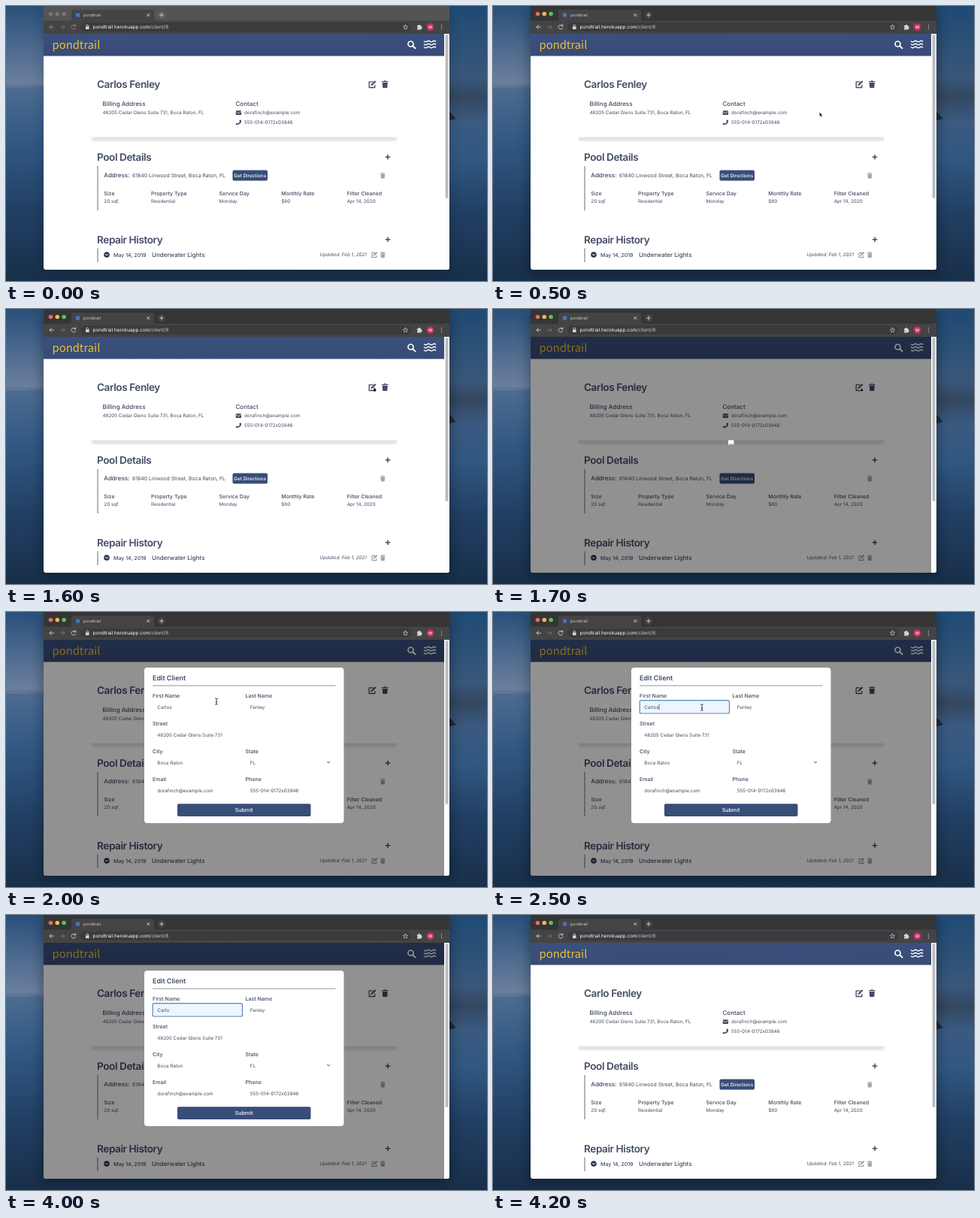
Write an HTML page that moves like this. It is 640 px wide and 366 px high and loops after 4.3 s.

```html
<!DOCTYPE html>
<html lang="en">
<head>
<meta charset="utf-8">
<title>Edit client</title>
<style>
html, body { margin: 0; width: 100%; height: 100%; overflow: hidden; background: #1b3452; }
svg { display: block; width: 100vw; height: 100vh; }
text { font-family: Inter, "Open Sans", sans-serif; font-size: 6.3px; fill: #454c62; white-space: pre; text-rendering: geometricPrecision; }
.logo { font: 500 14.8px "Noto Sans CJK JP", "Noto Sans CJK SC", "Noto Sans", sans-serif; fill: #f0bf30; }
.h { font-size: 13.6px; font-weight: 600; letter-spacing: -.42px; fill: #434d66; }
.sub { font-size: 8px; font-weight: 500; fill: #404860; }
.lab { font-size: 7px; font-weight: 500; fill: #404860; }
.title { font-size: 9px; font-weight: 600; fill: #404b66; }
.it { font-style: italic; }
.btn { font-weight: 500; fill: #fff; text-anchor: middle; }
.ui { fill: #c9cacc; }
.line { fill: none; stroke-linecap: round; stroke-linejoin: round; }
</style>
</head>
<body>
<svg viewBox="0 0 640 366" preserveAspectRatio="none">
  <defs>
    <linearGradient id="west" x2="0" y2="1">
      <stop offset="0" stop-color="#28507a"/>
      <stop offset=".14" stop-color="#4a688d"/>
      <stop offset=".28" stop-color="#6b7f9d"/>
      <stop offset=".3" stop-color="#4b6b91"/>
      <stop offset=".5" stop-color="#315883"/>
      <stop offset=".75" stop-color="#213f63"/>
      <stop offset="1" stop-color="#182f4a"/>
    </linearGradient>
    <linearGradient id="east" x2="0" y2="1">
      <stop offset="0" stop-color="#1f4a74"/>
      <stop offset=".26" stop-color="#39577a"/>
      <stop offset=".33" stop-color="#334760"/>
      <stop offset=".42" stop-color="#3a5a80"/>
      <stop offset=".55" stop-color="#315883"/>
      <stop offset=".75" stop-color="#213f63"/>
      <stop offset="1" stop-color="#182f4a"/>
    </linearGradient>
    <linearGradient id="bar" x2="0" y2="1">
      <stop offset="0" stop-color="#3b507e"/>
      <stop offset="1" stop-color="#374b75"/>
    </linearGradient>
    <filter id="soft" x="-20%" y="-100%" width="140%" height="300%"><feGaussianBlur stdDeviation="1.200"/></filter>
    <filter id="wide" x="-20%" y="-20%" width="140%" height="140%"><feGaussianBlur stdDeviation="8"/></filter>
    <clipPath id="frame"><path d="M50 0H590V347.500a3.500 3.500 0 0 1-3.500 3.500H53.500a3.500 3.500 0 0 1-3.500-3.500Z"/></clipPath>
    <g id="edit" class="line" stroke="currentColor">
      <path stroke-width="1.300" d="M6 2H1.200V9.700H8.800V6.500"/>
      <path stroke-width="2.200" stroke-linecap="butt" d="M4.300 6.400 9.700 1.200"/>
      <path stroke-width=".8" d="M3.600 7.200 4 5.800"/>
    </g>
    <g id="trash" fill="currentColor">
      <path d="M0 1H2.600L3.200 .2H5.300L5.900 1H8.500V2.200H0ZM.7 3H7.800L7.400 9.100Q7.300 10 6.400 10H2.100Q1.200 10 1.100 9.100Z"/>
    </g>
    <path id="plus" stroke="#424c66" stroke-width="1.500" stroke-linecap="round" d="M-2.700 0H2.700M0-2.700V2.700"/>
  </defs>

  <rect width="320" height="366" fill="url(#west)"/>
  <rect x="320" width="320" height="366" fill="url(#east)"/>
  <path d="M0 107.500H32" stroke="#a08a78" opacity=".35"/>
  <path d="M588 140Q593 142 596 147L599 150 588 153Z" fill="#1d2c3e"/>
  <rect id="shade" x="47" y="4" width="546" height="353" rx="6" filter="url(#wide)"/>

  <g clip-path="url(#frame)">
    <rect x="50" width="540" height="351" fill="#fff"/>
    <rect id="strip" x="50" width="540" height="20"/>
    <g id="lights"><circle cx="59.500" cy="10.500" r="2.800"/><circle cx="68.300" cy="10.500" r="2.800"/><circle cx="77.100" cy="10.500" r="2.800"/></g>
    <path d="M84 20q3 0 3-3V8q0-3 3-3H194q3 0 3 3v9q0 3 3 3Z" fill="#444445"/>
    <rect x="50" y="19.500" width="540" height="17.500" fill="#444445"/>
    <rect x="99" y="22" width="440" height="12" rx="6" fill="#3b3b3d"/>
    <rect x="93" y="9.500" width="5" height="5" fill="#3f78c8"/>
    <text class="ui" x="103" y="14" style="font-size:5.500px">pondtrail</text>
    <g class="line" stroke="#d2d3d5" stroke-width=".9">
      <path d="M187.600 10.300l3.400 3.400m0-3.400-3.400 3.400M204.600 12h4.800M207 9.600v4.800"/>
      <path id="nav" d="M63.500 28H58m2.500-2.500L58 28l2.500 2.500M92.300 26.200A2.900 2.900 0 1 0 92.800 29M92.700 24.700V26.700H90.700"/>
      <path d="M72.500 28H78m-2.500-2.500L78 28l-2.500 2.500" stroke="#77787b"/>
      <path d="M106.900 27.400V26.300a1.400 1.400 0 0 1 2.800 0V27.400"/>
      <path d="M531.500 25l.9 2 2.200.2-1.700 1.500.5 2.200-1.900-1.100-1.900 1.100.5-2.200-1.700-1.500 2.200-.2Z" stroke-width=".7"/>
    </g>
    <circle cx="207" cy="12" r="5.500" fill="#fff" opacity=".06"/>
    <rect x="106" y="27.300" width="4.600" height="3.700" rx=".5" fill="#d2d3d5"/>
    <text class="ui" x="115.500" y="30.300" style="font-size:6.400px"><tspan fill="#fff">pondtrail.herokuapp.com</tspan>/client/8</text>
    <path fill="#d2d3d5" d="M547 26h1.700a1.200 1.200 0 0 1 2.400 0H552.600v1.700a1.200 1.200 0 0 1 0 2.400V31.500H547V29.800a1.100 1.100 0 0 0 0-2.100Z"/>
    <circle cx="564.500" cy="28" r="4.800" fill="#cf2f68"/>
    <text class="btn" x="564.500" y="29.900" style="font-size:5.200px">M</text>
    <path d="M579.500 25.300v.01m0 2.690v.01m0 2.690v.01" class="line" stroke="#d2d3d5" stroke-width="1.300"/>

    <rect x="50" y="37" width="533" height="29.500" fill="url(#bar)"/>
    <text class="logo" x="61.500" y="57">pondtrail</text>
    <g class="line" stroke="#fff">
      <circle cx="538.500" cy="50.500" r="3.500" stroke-width="1.700"/>
      <path d="M541.300 53.300 544.500 56.300" stroke-width="2"/>
      <path id="waves" stroke-width="1.500"/>
    </g>

    <rect x="113.500" y="168" width="407" height="12" rx="4" fill="#000" opacity=".1" filter="url(#soft)"/>
    <rect x="110" y="72" width="414" height="102.500" fill="#fff"/>
    <text class="h" id="client" x="121" y="109"></text>
    <use href="#edit" x="482" y="98.800" color="#424c66"/>
    <use href="#trash" x="500" y="99" color="#424c66"/>
    <text class="sub" x="128.500" y="132.700">Billing Address</text>
    <text x="128.500" y="144.300">48205 Cedar Glens Suite 731, Boca Raton, FL</text>
    <text class="sub" x="305.500" y="132.700">Contact</text>
    <rect x="305.700" y="139.200" width="7.400" height="5.800" rx=".8" fill="#424c66"/>
    <path d="M306 140.600l3.400 2.300 3.400-2.300" class="line" stroke="#fff" stroke-width=".7"/>
    <text x="317" y="144.300">dorafinch@example.com</text>
    <path d="M311.300 151.400l1.800.5q.3 6-6.900 6.400l-.5-1.800 1.900-.9.900.9q1.700-.8 2.600-2.600l-.9-.8Z" fill="#424c66"/>
    <text x="317" y="157.300">555-014-0172x03946</text>

    <text class="h" x="121" y="206">Pool Details</text>
    <use href="#plus" x="508" y="201"/>
    <rect x="121" y="213" width="2" height="59" fill="#b3b4b8"/>
    <text class="sub" x="130.300" y="228">Address:</text>
    <text x="168" y="228" style="font-size:6.900px">61840 Linwood Street, Boca Raton, FL</text>
    <rect x="301.500" y="218.500" width="46.500" height="14" rx="2" fill="#384d78"/>
    <text class="btn" x="324.700" y="227.800">Get Directions</text>
    <use href="#trash" transform="translate(498 221.700) scale(.78)" color="#a2a4aa"/>
    <g id="facts"></g>

    <text class="h" x="121" y="315.800">Repair History</text>
    <use href="#plus" x="508" y="310.700"/>
    <rect x="121" y="322.500" width="2" height="18.500" fill="#b3b4b8"/>
    <circle cx="134" cy="331" r="3.800" fill="#2c3754"/>
    <path d="M132.200 330.300l1.800 1.700 1.800-1.700" class="line" stroke="#fff" stroke-width="1"/>
    <text class="lab" x="143" y="333.500">May 14, 2019</text>
    <text class="sub" x="194" y="333.700">Underwater Lights</text>
    <text class="it" x="417.500" y="333.300">Updated: Feb 1, 2021</text>
    <use href="#edit" transform="translate(486 327) scale(.78)" color="#8f929a"/>
    <use href="#trash" transform="translate(498 327.200) scale(.78)" color="#a2a4aa"/>

    <rect id="dim" x="50" y="37" width="533" height="314" opacity=".43"/>
    <rect x="583" y="37" width="7" height="314" fill="#fdfdfd"/>
    <rect x="584.600" y="38" width="4" height="218" rx="2" fill="#bdbdbf"/>

    <g id="modal">
      <rect x="184" y="74" width="265.500" height="207" rx="4" fill="#fff"/>
      <text class="title" x="195" y="90.800">Edit Client</text>
      <path d="M195 98H438.500" stroke="#85878c" stroke-width=".9"/>
      <rect id="focus" x="195.200" y="117.700" width="119.300" height="17.300" rx="2" fill="#eef5fd" stroke="#5685bd" stroke-width="1.200"/>
      <g id="fields"></g>
      <path id="caret" stroke="#333" stroke-width=".7"/>
      <path d="M427.400 199.300l1.700 1.700 1.700-1.700" class="line" stroke="#444" stroke-width=".9"/>
      <rect x="228" y="255.300" width="177.500" height="16.700" rx="2" fill="#384d78"/>
      <text class="btn" x="316.500" y="266.400" style="font-size:7.100px">Submit</text>
    </g>
  </g>

  <g id="pointer" stroke-linejoin="round">
    <path id="arrow" d="M0 0V6L1.400 4.700 2.300 6.800 3.300 6.400 2.400 4.400H4.200Z" fill="#000" stroke="#fff" stroke-width=".5"/>
    <path id="hand" d="M-.6 0Q0-.6.6 0V2.200L2.200 2.700Q2.800 3 2.700 3.800L2.200 5.800H-.6L-2.100 3.700Q-2 3.100-1.400 3.300L-.6 3.900Z" fill="#000" stroke="#fff" stroke-width=".4"/>
    <path id="beam" class="line" d="M-1.500-4.200Q0-4.200 0-3.200V3.200Q0 4.200-1.500 4.200M1.500-4.200Q0-4.200 0-3.200M0 3.200Q0 4.200 1.500 4.200M-.8.800H.8" stroke="#222" stroke-width=".8"/>
  </g>
</svg>
<script>
const LOOP = 4300, STEP = 100;
const FOCUS = 300, OPEN = 1700, CLICK = 2300, ERASE = 3200, CLOSE = 4100;
const el = id => document.getElementById(id);
const show = (id, on) => el(id).style.display = on ? "" : "none";

function addText(parent, x, y, value, cls = "") {
  const node = document.createElementNS("http://www.w3.org/2000/svg", "text");
  node.setAttribute("x", x);
  node.setAttribute("y", y);
  node.setAttribute("class", cls);
  node.textContent = value;
  el(parent).append(node);
  return node;
}

[[130.3, "Size", "20 sqf."], [193, "Property Type", "Residential"], [283.6, "Service Day", "Monday"],
 [366.3, "Monthly Rate", "$80"], [453.7, "Filter Cleaned", "Apr 14, 2020"]].forEach(([x, label, value]) => {
  addText("facts", x, 251.5, label, "lab");
  addText("facts", x, 262.3, value);
});

const inputs = [
  [0, 0, "First Name", "Carlos"], [1, 0, "Last Name", "Fenley"],
  [0, 1, "Street", "48205 Cedar Glens Suite 731"],
  [0, 2, "City", "Boca Raton"], [1, 2, "State", "FL"],
  [0, 3, "Email", "dorafinch@example.com"], [1, 3, "Phone", "555-014-0172x03946"]
].map(([col, row, label, value]) => {
  const x = 195 + col * 123.5, y = 114.3 + row * 36.9;
  addText("fields", x, y, label, "lab");
  return addText("fields", x + 6.3, y + 14.5, value);
});

el("waves").setAttribute("d", [47, 51, 55]
  .map(y => `M556.500 ${y}q1.900 1.600 3.800 0t3.800 0 3.800 0 3.800 0`).join(""));

// time, x, y
const path = [[300, 425, 150], [1000, 472.5, 106], [1300, 489, 103.5], [1700, 490, 104],
  [2000, 280, 119], [2300, 278, 127], [3200, 278, 127]];
// time, modal scale
const growth = [[1700, .028], [1800, .55], [1900, .93], [2000, 1]];

function at(keys, t) {
  const i = keys.findIndex(k => k[0] > t);
  if (i < 0) return keys[keys.length - 1].slice(1);
  if (!i) return keys[0].slice(1);
  const a = keys[i - 1], b = keys[i], p = (t - a[0]) / (b[0] - a[0]);
  const e = p * p * (3 - 2 * p);
  return a.slice(1).map((v, n) => v + (b[n + 1] - v) * e);
}

function render(t) {
  const active = t >= FOCUS;
  el("strip").setAttribute("fill", active ? "#353536" : "#545455");
  el("nav").setAttribute("stroke", active ? "#d2d3d5" : "#8b8c8e");
  el("shade").setAttribute("opacity", active ? .3 : .15);
  const colors = active ? ["#e86c60", "#efbb52", "#64be58"] : Array(3).fill("#77777a");
  [...el("lights").children].forEach((c, i) => c.setAttribute("fill", colors[i]));

  const open = t >= OPEN && t < CLOSE;
  show("dim", open);
  show("modal", open);
  el("client").textContent = (t >= CLOSE ? "Carlo" : "Carlos") + " Fenley";
  const [s] = at(growth, t);
  el("modal").setAttribute("transform", `translate(316.7 177.500) scale(${s}) translate(-316.7 -177.500)`);

  inputs[0].textContent = t >= ERASE ? "Carlo" : "Carlos";
  show("focus", t >= CLICK);
  const since = t - (t >= ERASE ? ERASE : CLICK);
  show("caret", since >= 0 && since % 1000 < 500);
  if (open) el("caret").setAttribute("d", `M${201.8 + inputs[0].getComputedTextLength()} 122.700v7.600`);

  const [x, y] = at(path, t);
  show("pointer", t >= FOCUS && t < ERASE);
  el("pointer").setAttribute("transform", `translate(${x} ${y})`);
  const kind = t < 1200 ? "arrow" : t < 1800 ? "hand" : t < 1900 ? "arrow" : "beam";
  ["arrow", "hand", "beam"].forEach(k => show(k, k === kind));
}

const start = performance.now();
let last = -1;
function tick() {
  const t = Math.floor((performance.now() - start) % LOOP / STEP) * STEP;
  if (t !== last) render(last = t);
  requestAnimationFrame(tick);
}
tick();
</script>
</body>
</html>
```
